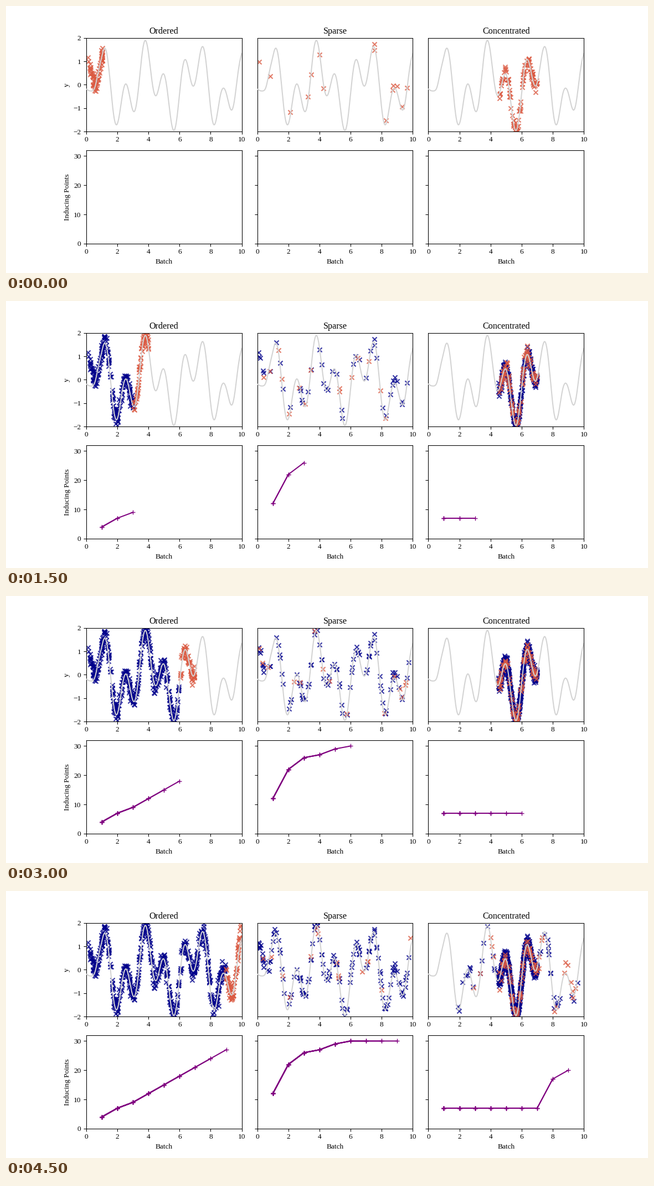
These frames come from a looping animation (1159 by 483 pixels, 5 s). A matplotlib script:

```python
import numpy as np
import matplotlib.pyplot as plt
from matplotlib.animation import FuncAnimation

plt.rcParams["font.family"] = "Liberation Serif"
plt.rcParams["font.size"] = 10

WIDTH, HEIGHT, DPI = 1159, 483, 96.6
BATCHES = 10
RED, BLUE = "#db5a42", "darkblue"
rng = np.random.default_rng(4)


def truth(x):
    return np.sin(2 * x) + np.cos(5 * x)


def bump(x, height, center, width):
    return height * np.exp(-((x - center) / width) ** 2)


def fitted(x):
    """Smooth prediction: the true function with a few local errors."""
    errors = [(-1.3, 0.1, 0.33), (0.35, 0.75, 0.2), (-0.1, 1.6, 0.7),
              (-0.11, 3.4, 0.5), (-0.08, 8.2, 0.3), (-0.2, 8.83, 0.25),
              (-0.54, 10, 0.25)]
    return truth(x) + sum(bump(x, *e) for e in errors)


def observe(x, noise):
    return np.column_stack([x, truth(x) + rng.normal(0, noise, x.size)])


def ordered_x(batch):
    return rng.uniform(batch, batch + 1, 65) * 0.985 + 0.08


def sparse_x(batch):
    return rng.uniform(0.05, 9.95, 15)


def dense_x(batch):
    """A narrow range at first; the last batches also spread outside it."""
    inside = rng.uniform(4.5, 7, 100 if batch < 7 else 70)
    spread = rng.normal(5.75, 2.2, 0 if batch < 7 else 32)
    return np.concatenate([inside, spread])


batch_no = np.arange(1, BATCHES)
PANELS = [
    ("Ordered", ordered_x, 0.18, 3 * batch_no + (batch_no < 3)),
    ("Sparse", sparse_x, 0.14, np.array([12, 22, 26, 27, 29] + [30] * 4)),
    ("Concentrated", dense_x, 0.17, np.array([7] * 7 + [17, 20])),
]

# The small margin guards against rounding down to one pixel less.
fig, axes = plt.subplots(2, 3, dpi=DPI,
                         figsize=((WIDTH + 1e-3) / DPI, (HEIGHT + 1e-3) / DPI))
fig.subplots_adjust(left=0.125, right=0.9, bottom=0.11, top=0.88,
                    wspace=0.1, hspace=0.2)
grid = np.linspace(0, 10, 600)


def crosses(ax, color, z):
    return ax.scatter([], [], s=36, marker="x", color=color, alpha=0.8,
                      linewidths=1.5, zorder=z)


panels = []
for col, (title, pick_x, noise, counts) in enumerate(PANELS):
    data = [observe(pick_x(b), noise) for b in range(BATCHES)]
    top, low = axes[:, col]
    top.set(title=title, xlim=(0, 10), ylim=(-2, 2))
    top.set_yticks(range(-2, 3) if col == 0 else [])
    low.set(xlabel="Batch", xlim=(0, 10), ylim=(0, 32))
    low.set_yticks(range(0, 31, 10))
    low.tick_params(labelleft=col == 0)
    top.plot(grid, fitted(grid), color="lightgray", lw=1.5, zorder=3)
    # Each batch redraws the whole count line, so older parts look heavier.
    lines = [low.plot(batch_no[:k], counts[:k], "+-", color="purple", lw=1.5)[0]
             for k in batch_no]
    panels.append((data, crosses(top, BLUE, 1), crosses(top, RED, 2), lines))

axes[0, 0].set_ylabel("y")
axes[1, 0].set_ylabel("Inducing Points")


def draw(batch):
    changed = []
    for data, old, new, lines in panels:
        old.set_offsets(np.concatenate([np.empty((0, 2))] + data[:batch]))
        new.set_offsets(data[batch])
        for k, line in enumerate(lines, 1):
            line.set_visible(k <= batch)
        changed += [old, new, *lines]
    return changed


anim = FuncAnimation(fig, draw, frames=BATCHES, interval=500,
                     repeat=True, repeat_delay=0, init_func=lambda: draw(0))
plt.show()
```
